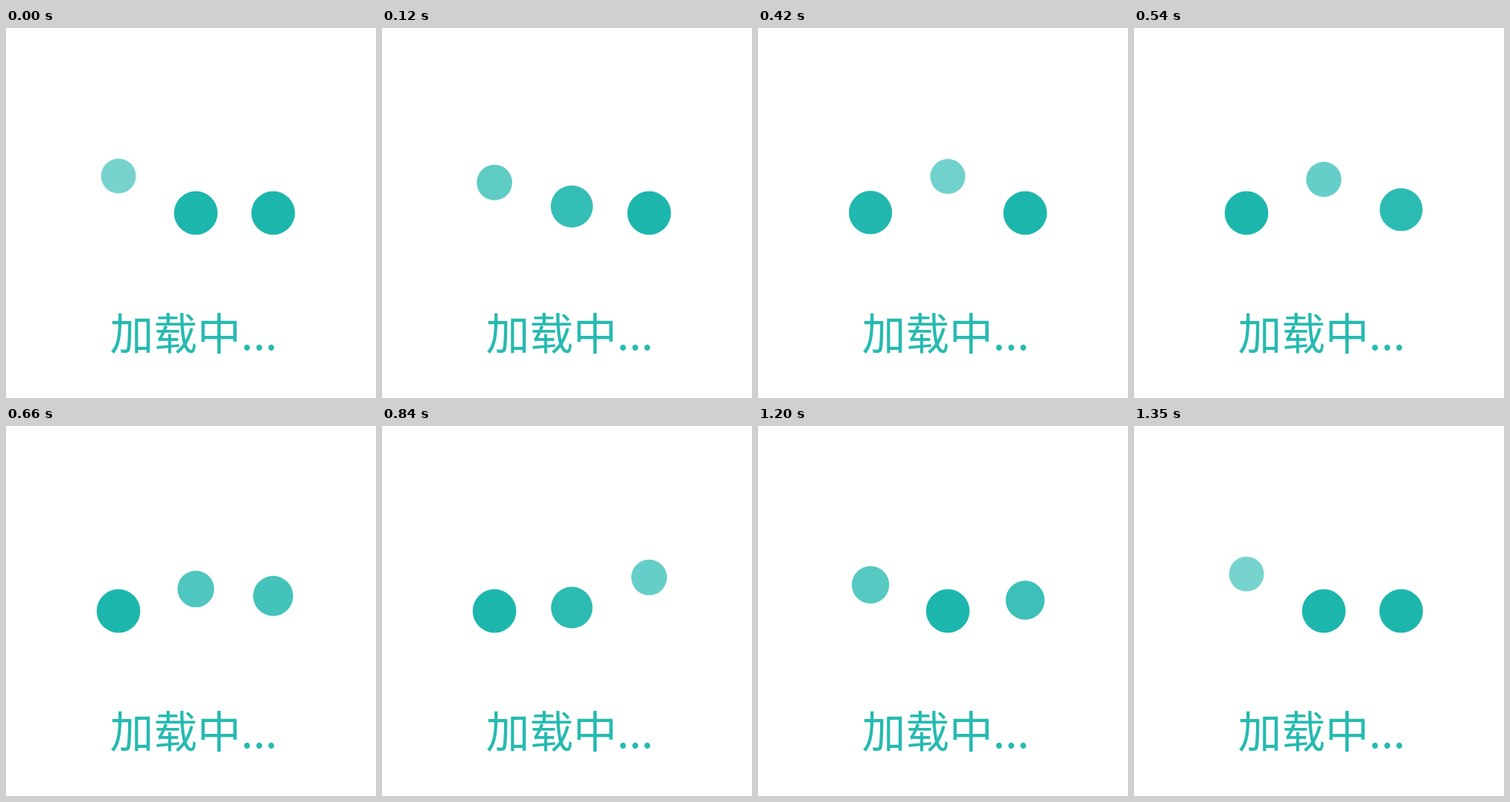
An HTML page for the animation above (1.38 s loop, 500x500 px).

```html
<!DOCTYPE html>
<html lang="zh-CN">
<head>
<meta charset="utf-8">
<style>
  html, body { margin: 0; width: 100%; height: 100%; overflow: hidden; background: #fff; }
  svg { display: block; width: 100vw; height: 100vh; }
  circle { fill: #1cb6ad; }
  text { font: 300 59px "Noto Sans CJK SC", "Noto Sans CJK", sans-serif; fill: #26bab0; }
</style>
</head>
<body>
<svg viewBox="0 0 500 500">
  <circle cx="152"/>
  <circle cx="256.5"/>
  <circle cx="361"/>
  <text x="140.5" y="435">加载中...</text>
</svg>
<script>
const LOOP = 1380, STEP = 30;
const KEYS = [0, 450, 930, 1350];
const dots = document.querySelectorAll('circle');

const smooth = s => s * s * (3 - 2 * s);

// cubic-bezier(a, 0, b, 1), solved by bisection
function ease(x, a, b) {
  let lo = 0, hi = 1;
  for (let i = 0; i < 24; i++) {
    const s = (lo + hi) / 2, r = 1 - s;
    if (3 * r * r * s * a + 3 * r * s * s * b + s * s * s < x) lo = s;
    else hi = s;
  }
  return smooth(lo);
}

function place(dot, lift, shrink, fade) {
  dot.setAttribute('cy', 250 - 50 * lift);
  dot.setAttribute('r', 29.5 - 5.9 * shrink);
  dot.setAttribute('opacity', 1 - 0.405 * fade);
}

function draw(now) {
  const t = Math.min(Math.floor(now % LOOP / STEP) * STEP, KEYS[3]);
  const phase = t < KEYS[1] ? 0 : t < KEYS[2] ? 1 : 2;
  const x = (t - KEYS[phase]) / (KEYS[phase + 1] - KEYS[phase]);

  // In each phase one dot falls, the next one rises and the third rests.
  place(dots[phase], 1 - smooth(x), 1 - ease(x, 0.61, 0.83), 1 - x);
  place(dots[(phase + 1) % 3], smooth(x), smooth(x), x);
  place(dots[(phase + 2) % 3], 0, 0, 0);
}

const start = performance.now();
(function frame() {
  draw(performance.now() - start);
  requestAnimationFrame(frame);
})();
</script>
</body>
</html>
```
